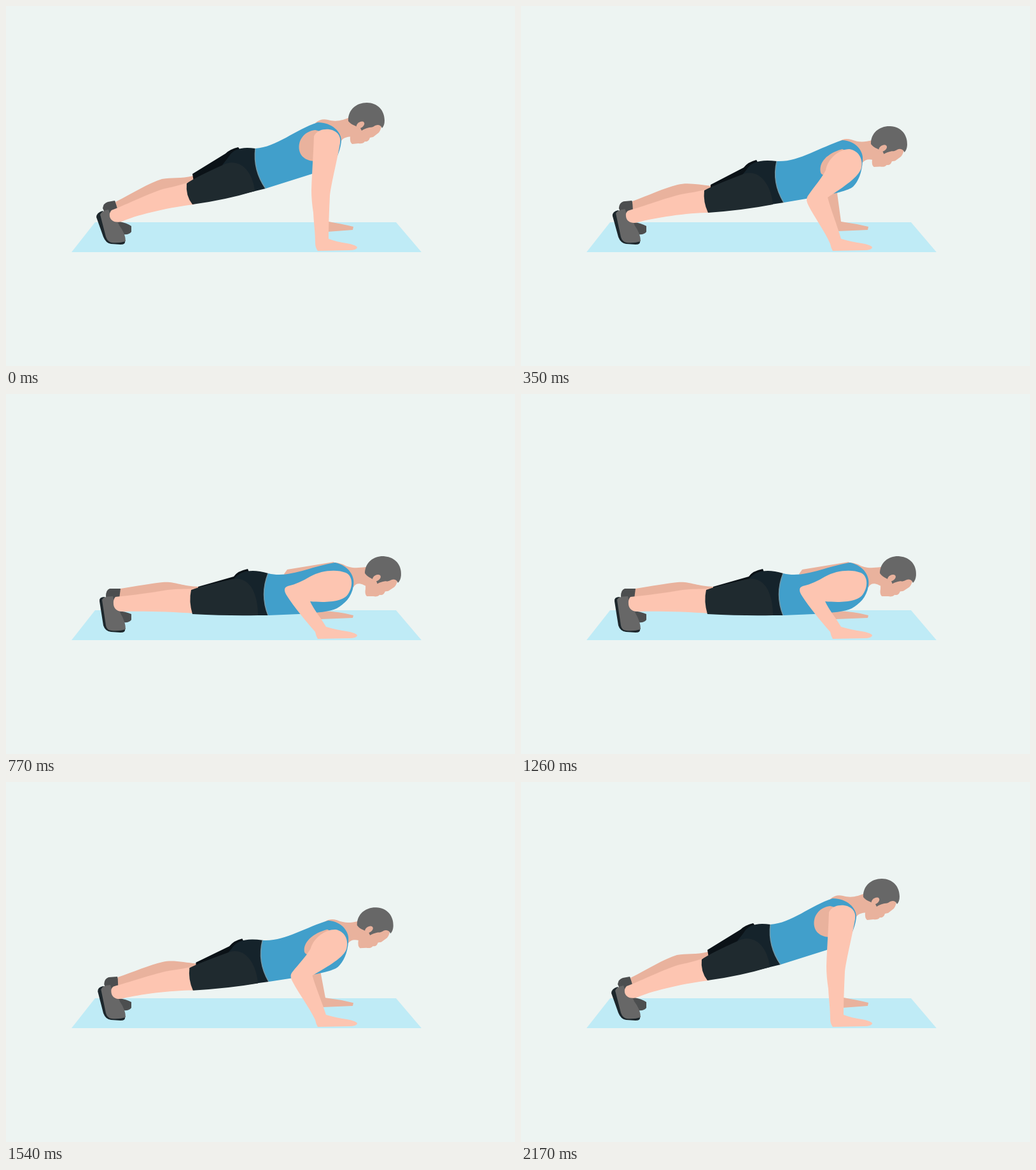
These frames come from a looping animation (800x566 px, 2240 ms). An HTML page with a canvas:

```html
<!DOCTYPE html>
<html lang="en">
<head>
<meta charset="utf-8">
<title>Push-up</title>
<style>
html, body { margin: 0; width: 100%; height: 100%; overflow: hidden; background: #edf4f2; }
canvas { display: block; }
</style>
</head>
<body>
<canvas id="stage" width="800" height="566"></canvas>
<script>
const ctx = document.getElementById('stage').getContext('2d');
const LOOP = 2240, STEP = 70, MID = 0.36;
const SKIN = '#fdc5b1', SHADE = '#e9b29d', BLUE = '#419fcb', GREY = '#676767', SOLE = '#1d272c';

// Depth of the push-up over time: 0 = arms straight, 1 = lowered
const DEPTH = [[0, 0], [140, 0], [280, 0.2], [350, 0.36], [560, 0.79], [630, 0.92], [700, 1],
  [1260, 1], [1330, 0.87], [1540, 0.44], [1680, 0.22], [1750, 0], [LOOP, 0]];

// Near hand rests in one place, so every arm pose shares it
const HAND = ' Q520 371 535 373 Q552 376 552 380 Q550 384 540 384 L490 385 ';

// Each part: fill, then its outline raised, [halfway,] lowered
const BODY = [
  ['#4c4e4f',
    'M152 318 Q153 310 160 308 L171 306 L176 318 L178 339 Q190 341 197 346 L197 355 Q194 360 184 359 L168 352Z',
    'M157 318 Q157 308 163 306 L180 306 L182 318 L176 341 Q188 342 197 346 L197 355 Q194 360 184 359 L168 352Z'],
  [SHADE,
    'M172 308 C200 294 225 278 245 272 C260 269 275 272 294 267 L298 285 L200 318 L176 322Z',
    'M175 307 C200 298 225 286 246 281 C262 277 280 281 299 283 L302 300 L200 322 L176 322Z',
    'M180 306 C205 302 228 298 246 296 C264 294 275 302 303 303 L305 318 L200 325 L178 322Z'],
  [SOLE,
    'M142 332 Q142 325 152 322 L160 340 L172 366 L187 370 Q188 375 180 375 L165 374 Q157 373 153 363Z',
    'M147 326 Q146 319 155 319 L162 340 L172 366 L187 370 Q188 375 180 375 L165 374 Q156 373 153 364Z'],
  [GREY,
    'M148 328 Q150 322 161 320 L168 338 Q176 337 178 345 Q188 358 188 370 Q178 373 166 372 Q160 371 157 363Z',
    'M151 324 Q152 318 168 318 L172 338 Q179 338 180 345 Q188 358 188 370 Q178 373 166 372 Q158 371 157 364Z'],
  [SKIN,
    'M166 321 C190 312 230 292 250 287 C265 284 275 281 290 276 L296 312 C260 316 210 327 184 338 C174 342 165 339 163 331 Q162 325 166 321Z',
    'M168 322 C192 315 230 301 252 296 C268 293 278 292 292 288 L297 325 C260 325 210 333 184 340 C174 343 166 339 165 331 Q164 325 168 322Z',
    'M172 319 C195 317 230 312 254 308 C270 306 280 307 295 306 L297 345 C260 342 210 341 184 342 C176 342 170 339 169 331 Q168 323 172 319Z'],
  [SHADE,
    'M492 210 L515 215 Q508 270 507 300 L507 339 Q525 342 546 347 L545 352 L505 355 L490 335 L488 300 L488 280Z',
    'M495 240 L520 270 Q500 283 497 295 L503 339 Q525 342 546 347 L545 352 L498 354 L490 335 L470 298 L472 290Z',
    'M515 264 L525 280 Q480 290 470 295 L495 341 Q525 342 546 348 L545 352 L495 354 L480 343 L437 283 L442 276Z'],
  ['#0b1217',
    'M293 264 L345 232 Q352 225 365 222 L385 250 L295 276Z',
    'M298 281 L350 254 Q357 245 370 242 L385 270 L298 291Z',
    'M302 303 L358 287 Q364 278 380 275 L390 300 L302 312Z'],
  ['#15232b',
    'M350 237 Q360 219 392 224 Q388 258 408 287 L350 301 L340 250Z',
    'M354 258 Q364 239 402 244 Q394 278 413 309 L354 318 L344 270Z',
    'M358 291 Q374 271 412 282 Q399 315 412 348 L350 348 L346 300Z'],
  ['#1f2a2f',
    'M284 279 Q296 270 345 248 C370 240 388 262 391 291 Q345 305 293 312 Q282 298 284 279Z',
    'M288 290 Q300 283 350 264 C376 256 393 282 396 312 Q350 321 294 325 Q286 308 288 290Z',
    'M291 308 Q304 303 356 291 C384 286 396 315 396 348 Q350 349 293 346 Q287 326 291 308Z'],
  [SHADE,
    'M486 184 Q495 176 506 179 C520 183 530 179 541 175 L552 206 C540 205 530 205 526 214 L500 200Z',
    'M500 213 Q508 207 519 210 C532 215 540 214 552 211 L562 244 C548 240 542 240 537 246 L515 228Z',
    'M505 268 Q515 262 530 268 C540 274 550 274 566 272 L572 306 C558 296 550 296 546 304 L525 284Z'],
  [BLUE,
    'M392 224 C425 222 455 194 490 183 C512 183 528 198 527 213 C525 230 518 245 508 255 C500 259 492 261 484 263 L408 287 Q388 258 392 224Z',
    'M402 244 C435 246 470 222 505 211 C526 212 539 228 537 243 C536 262 530 276 522 284 C516 290 490 296 460 301 L413 309 Q394 278 402 244Z',
    'M412 282 C445 290 475 272 517 265 C540 270 549 288 546 302 C543 320 532 330 520 337 C510 342 490 344 460 346 L412 348 Q399 315 412 282Z'],
  [SHADE,
    'M486 195 C468 197 458 212 461 227 C464 240 476 244 487 244 L505 200Z',
    'M505 225 C482 231 467 246 471 262 C473 267 480 268 490 262 L515 230Z',
    'M505 279 C480 286 460 298 455 305 C460 312 480 312 490 310 L515 285Z'],
];

const WAIST = ['M392 224 Q388 258 408 287', 'M402 244 Q394 278 413 309', 'M412 282 Q399 315 412 348'];

const ARM = [SKIN,
  'M484 205 C488 195 500 193 508 194 C522 196 527 206 525 216 C521 240 512 275 509 298 C508 320 507 345 507 366' + HAND +
    'Q486 380 486 372 C486 355 484 345 483 325 C481 312 480 300 480 290 C481 260 483 235 484 205Z',
  'M479 258 C482 240 500 225 516 225 C530 227 538 240 535 254 C532 268 508 284 482 301 C487 320 497 345 503 366' + HAND +
    'Q487 380 486 374 C478 355 460 330 452 314 C448 306 448 302 452 297 C460 285 472 272 479 258Z',
  'M478 287 C495 277 520 275 534 281 C545 286 546 302 538 314 C530 328 500 328 478 326 C483 338 495 352 503 366' + HAND +
    'Q487 380 486 374 C472 358 452 334 442 318 C436 309 437 304 443 302 C456 299 466 294 478 287Z'];

const FACE = new Path2D('M539 178 L590 186 Q590 194 586 199 L577 206 L572 207 Q570 214 564 213 Q561 217 554 216 L544 217 Q540 214 541 205Z');
const HAIR = new Path2D('M538 181 C537 163 551 152 567 152 C584 152 595 164 595 180 Q595 188 591 192 Q589 187 584 187 C577 188 579 191 571 191 Q563 193 559 196 L557 192 L548 188 Q542 186 538 181Z');

const lerp = (a, b, k) => a + (b - a) * k;

function depthAt(t) {
  const i = DEPTH.findIndex(([time]) => time > t);
  const [t0, a] = DEPTH[i - 1], [t1, b] = DEPTH[i];
  return lerp(a, b, (t - t0) / (t1 - t0));
}

function blend(poses, p) {
  let [from, to] = poses, k = p;
  if (poses.length === 3) {
    if (p < MID) k = p / MID;
    else { [, from, to] = poses; k = (p - MID) / (1 - MID); }
  }
  const ends = to.match(/-?[\d.]+/g);
  let i = 0;
  return from.replace(/-?[\d.]+/g, n => lerp(+n, +ends[i++], k).toFixed(2));
}

function fill(path, color) {
  ctx.fillStyle = color;
  ctx.fill(path);
}

const drawPart = ([color, ...poses], p) => fill(new Path2D(blend(poses, p)), color);

function drawHead(p) {
  const [x, y, turn] = blend(['566 180 0', '578 217 0.04', '592 283 0.08'], p).split(' ').map(Number);
  ctx.save();
  ctx.translate(x, y);
  ctx.rotate(turn);
  ctx.translate(-566, -180);
  fill(FACE, SHADE);
  fill(HAIR, GREY);
  ctx.beginPath();
  ctx.ellipse(557, 187, 7, 4.5, -0.6, 0, Math.PI * 2);
  ctx.fillStyle = SHADE;
  ctx.fill();
  ctx.restore();
}

function draw(p) {
  ctx.fillStyle = '#edf4f2';
  ctx.fillRect(0, 0, 800, 566);
  fill(new Path2D('M140 340H613L653 387H103Z'), '#bfebf6');
  BODY.forEach(part => drawPart(part, p));
  ctx.strokeStyle = '#6f99aa';
  ctx.lineWidth = 1.5;
  ctx.stroke(new Path2D(blend(WAIST, p)));
  drawHead(p);
  drawPart(ARM, p);
}

const start = performance.now();
function tick() {
  const t = (performance.now() - start) % LOOP;
  draw(depthAt(Math.floor(t / STEP) * STEP));
  requestAnimationFrame(tick);
}
tick();
</script>
</body>
</html>
```
